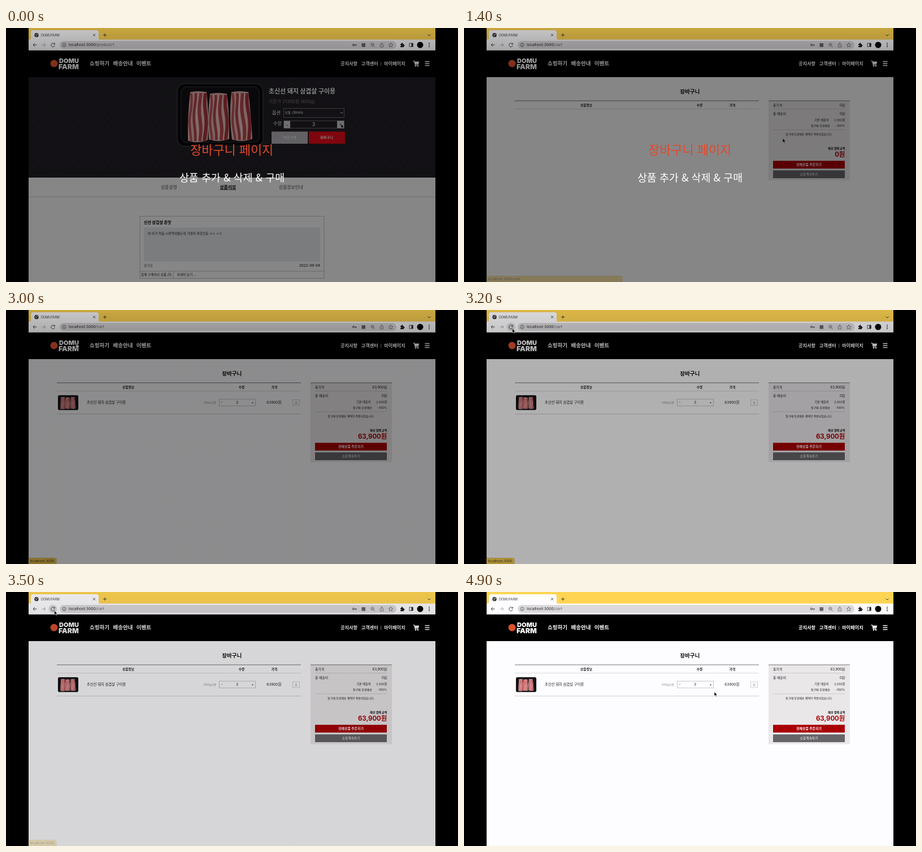
Animation of 800 by 450 pixels, one loop 5 s. Source, as an HTML page:

```html
<!DOCTYPE html>
<html lang="ko">
<head>
<meta charset="utf-8">
<style>
html, body { margin: 0; width: 100%; height: 100%; overflow: hidden; background: #000; }
svg { display: block; width: 800px; height: 450px; }
text { font-family: Inter, "Noto Sans CJK KR", "Noto Sans CJK", sans-serif; white-space: pre; }
.title text { font-family: "Noto Sans CJK KR", "Noto Sans CJK", sans-serif; }
</style>
</head>
<body>
<svg id="stage" viewBox="0 0 800 450"></svg>
<script>
const $ = id => document.getElementById(id);
const WHITE = '#fdfcfe', INK = '#252326';

// Text is placed by the middle of its line.
const text = (x, mid, size, str, fill = INK, anchor = 'start', weight = 400) =>
  `<text x="${x}" y="${(mid + size * .36).toFixed(2)}" font-size="${size}" fill="${fill}" text-anchor="${anchor}" font-weight="${weight}">${str}</text>`;
const rect = (x, y, w, h, fill, more = '') =>
  `<rect x="${x}" y="${y}" width="${w}" height="${h}" fill="${fill}" ${more}/>`;
const frame = (x, y, w, h, color, fill = 'none') =>
  rect(x + .5, y + .5, w - 1, h - 1, fill, `stroke="${color}" stroke-width=".8"`);
const line = (x1, x2, y, color, w = .8) =>
  `<path d="M${x1} ${y}H${x2}" stroke="${color}" stroke-width="${w}"/>`;
const icon = (d, color = '#444246', w = 1) =>
  `<path d="${d}" fill="none" stroke="${color}" stroke-width="${w}" stroke-linejoin="round"/>`;
const shape = (d, fill) => `<path d="${d}" fill="${fill}"/>`;
const disc = (x, y, r, fill) => `<circle cx="${x}" cy="${y}" r="${r}" fill="${fill}"/>`;

// One slice of meat: a pale slab with wavy red bands.
function slab(x, y, w, h, lean) {
  const band = (u, width, color) => {
    let d = '';
    for (let i = 0; i <= 12; i++) {
      const v = i / 12;
      const px = x + w * u + lean * v + Math.sin(v * 7 + u * 4) * 1.6;
      d += (i ? 'L' : 'M') + px.toFixed(1) + ' ' + (y + 2 + (h - 4) * v).toFixed(1);
    }
    return icon(d, color, width);
  };
  return shape(`M${x + 3} ${y}Q${x + w / 2} ${y - 3} ${x + w - 3} ${y}Q${x + w + 2} ${y + h / 2} ${x + w + lean} ${y + h - 4}
    Q${x + w / 2 + lean} ${y + h + 3} ${x + lean} ${y + h - 3}Q${x - 2} ${y + h / 2} ${x + 3} ${y}Z`, '#e9b9b3') +
    band(.12, 4, '#c2545a') + band(.33, 4.5, '#b8434c') + band(.46, 2, '#f3d9d2') +
    band(.6, 6, '#bd4a52') + band(.72, 1.6, '#efcdc6') + band(.87, 6, '#a9353f');
}

const tray = `<symbol id="tray" viewBox="0 0 154 113">
  ${rect(1, 1, 152, 111, '#09090b', 'rx="13" stroke="#3c3a40" stroke-width="1.5"')}
  ${rect(8, 7, 138, 98, '#111114', 'rx="10" stroke="#2b292f" stroke-width="1.5"')}
  ${slab(21, 16, 35, 89, -1)}${slab(56, 19, 36, 84, 1)}${slab(94, 16, 36, 87, 4)}
</symbol>`;

const browser = [
  rect(40, 0, 720, 21, '#ffd452'),
  shape('M41 21Q44 21 44 18V8Q44 4 48 4H160Q164 4 164 8V18Q164 21 167 21Z', WHITE),
  rect(40, 20.5, 720, 19, WHITE),
  disc(54, 12.5, 3.8, '#343236'),
  icon('M51.5 11.5L54 12.5L53 15M54.5 9.5L55.5 11.5L57 12', '#eee', .8),
  text(62, 12.5, 5.6, 'DOMUFARM', '#434145'),
  icon('M154 10.5L158 14.5M158 10.5L154 14.5', '#343236', .9),
  icon('M172 12.5H178M175 9.5V15.5', '#343236', .9),
  icon('M746.5 11.5L749 14L751.5 11.5', '#343236'),
  icon('M54.5 30H48M51 27L48 30L51 33'),
  icon('M63.5 30H70M67 27L70 30L67 33', '#aaa8ac'),
  '<circle id="hover" cx="83" cy="30" r="7.5" fill="#dddbde"/>',
  icon('M85.8 28.2A3.3 3.3 0 1 0 86.3 31M86.3 26.5V28.8H84'),
  rect(95, 23, 596, 14, '#dcd9dc', 'rx="7"'),
  '<circle cx="103" cy="30" r="3.2" fill="none" stroke="#555357" stroke-width=".8"/>',
  icon('M103 29.5V32M103 27.9V28.7', '#555357', .9),
  `<text x="111" y="32.4" font-size="6.75" fill="#252326">localhost:3000<tspan id="path" fill="#626064"></tspan></text>`,
  '<circle cx="615" cy="30" r="1.6" fill="none" stroke="#444246"/>',
  icon('M616.5 30H621M619.5 30V32'),
  rect(629.5, 27, 6.5, 6.5, '#656368'),
  '<circle cx="648.5" cy="29.5" r="2.6" fill="none" stroke="#656368" stroke-width=".9"/>',
  icon('M650.3 31.3L652.7 33.7M647.2 29.5H649.8', '#656368', .9),
  icon('M663.3 29H662.3V33.7H667.7V29H666.7M665 31.5V26.2M663.3 27.8L665 26L666.7 27.8', '#656368', .8),
  icon('M681 26.2L682.1 28.8L685 29L682.8 30.9L683.5 33.7L681 32.2L678.5 33.7L679.2 30.9L677 29L679.9 28.8Z', '#656368', .8),
  shape('M698 28H700Q699.5 26 701 26Q702.5 26 702 28H704V30Q705.7 29.5 705.7 31Q705.7 32.5 704 32V34H698V32Q699.5 32 699.5 31Q699.5 30 698 30Z', INK),
  frame(713.5, 26.5, 7, 7, INK), rect(717.5, 27, 3, 6, INK),
  disc(733, 30, 5.5, '#000'),
  disc(749, 27, .9, INK), disc(749, 30, .9, INK), disc(749, 33, .9, INK)
].join('');

const header = [
  rect(40, 39.5, 720, 47.5, '#000'),
  disc(85, 63, 6.5, '#d8512f'),
  text(94, 57.8, 11, 'DOMU', WHITE, 'start', 900),
  text(93, 68.8, 12.3, 'FARM', WHITE, 'start', 900),
  text(148, 63, 9.5, '쇼핑하기', WHITE, 'start', 700),
  text(189.5, 63, 9.5, '배송안내', WHITE, 'start', 700),
  text(230.7, 63, 9.5, '이벤트', WHITE, 'start', 700),
  text(592, 63, 8.2, '공지사항', WHITE, 'start', 700),
  text(628.7, 63, 8.2, '고객센터', WHITE, 'start', 700),
  rect(663.3, 60, .8, 7, '#aaa'),
  text(669, 63, 8.2, '마이페이지', WHITE, 'start', 700),
  icon('M720.5 58.7H722.7L724.3 65.5H730', WHITE, 1.2),
  shape('M722.8 59.5H731.3L730 64.3H724Z', WHITE), disc(725, 67.2, 1.2, WHITE), disc(729, 67.2, 1.2, WHITE),
  icon('M741.5 59.5H749.5M741.5 63H749.5M741.5 66.5H749.5', WHITE, 1.5)
].join('');

const product = [
  rect(40, 87, 720, 178, '#221f25'),
  '<use href="#tray" x="302" y="97.5" width="154" height="113"/>',
  text(465, 112, 10.9, '초신선 돼지 삼겹살 구이용', WHITE, 'start', 700),
  text(465, 130.5, 7.9, '기준가 21300원 (600g)', '#858187'),
  text(471, 150, 8.2, '옵션', WHITE, 'start', 500),
  frame(491, 142, 108, 17, '#858187'),
  text(493.5, 150.3, 5.8, '보통 (16mm)', WHITE),
  icon('M591.5 149L594 151.5L596.5 149', WHITE, .9),
  text(473, 169.5, 8.2, '수량', WHITE, 'start', 500),
  frame(491, 164, 108, 14, '#858187'),
  rect(492, 164.5, 11, 13, '#d2cfd4'), rect(586, 164.5, 12, 13, '#d2cfd4'),
  text(497.5, 172, 8, '-', '#111', 'middle', 600),
  text(544.5, 170.3, 9, '3', WHITE, 'middle'),
  text(592, 170, 7.5, '+', '#111', 'middle'),
  rect(470, 183.5, 64, 21.5, '#b9b6bc'), rect(536, 183.5, 64, 21.5, '#f00a1a'),
  text(502.3, 194.2, 6.2, '바로구매', WHITE, 'middle', 500),
  text(567.5, 194.2, 6.2, '장바구니', WHITE, 'middle', 700),
  text(288.3, 282, 7.8, '상품설명', '#555357', 'middle'),
  text(392.8, 282, 7.8, '상품리뷰', '#000', 'middle', 700), line(378.5, 407, 286.3, '#000'),
  text(504.5, 282, 7.8, '상품정보안내', '#555357', 'middle'),
  line(40, 760, 299, '#c5c2c6'),
  frame(236.5, 333, 327, 111, '#b9b6ba'),
  text(244, 344.3, 7, '신선 삼겹살 존맛', '#000', 'start', 700),
  rect(244, 353.5, 312, 60, '#e7eaed'),
  text(251, 364, 5.7, '와 이거 처음 시켜먹어봤는데 가성비 최강인듯 ㅇㅇ ㅇㅈ'),
  text(244, 421, 5.8, '문가온', '#555357'),
  text(556, 421, 6.1, '2022-09-04', '#444246', 'end', 600),
  line(237, 563, 431, '#b9b6ba'), rect(295.7, 431, .8, 12.5, '#b9b6ba'),
  text(239, 437.3, 5.7, '함께 구매하신 상품 (5)'),
  text(302.5, 437.3, 5.7, '자세히 보기 ...')
].join('');

const cart = [
  text(399.7, 112.5, 9.5, '장바구니', '#111', 'middle', 700),
  line(90, 522, 129, '#555357'),
  text(216.5, 136.5, 5.7, '상품정보', INK, 'middle', 700),
  text(417, 136.5, 5.7, '수량', INK, 'middle', 700),
  text(475, 136.5, 5.7, '가격', INK, 'middle', 700),
  line(90, 522, 143.7, '#d2cfd3'),
  '<g id="item">',
  '<use href="#tray" x="91.7" y="150.7" width="36.5" height="26.8"/>',
  text(143, 164, 6.3, '초신선 돼지 삼겹살 구이용'),
  text(372, 164.3, 5, '600g기준', '#8b898c', 'end'),
  frame(377, 157.5, 65, 13, '#b9b6ba'),
  text(382, 164, 6.5, '-', INK, 'middle'),
  text(409, 164, 6.5, '3', INK, 'middle'),
  text(436.3, 164, 6.5, '+', INK, 'middle'),
  text(474.3, 164, 6.5, '63900원', INK, 'middle'),
  frame(507, 158.5, 13, 11, '#c5c2c6'),
  text(513.5, 164.3, 6.5, 'X', '#8b898c', 'middle'),
  line(90, 522, 184.3, '#c5c2c6'),
  '</g>',
  rect(539, 129, 144, 140.5, '#eae7e9'), line(539, 683, 129, '#555357'),
  text(547, 136.5, 5.8, '총가격'),
  `<g class="total">${text(674.3, 136.5, 6, '', INK, 'end')}</g>`,
  line(547, 674, 143.7, '#c5c2c6'),
  text(547, 151.5, 5.8, '총 배송비'), text(674.3, 151.5, 6, '0원', INK, 'end'),
  text(645.5, 163.5, 5.2, '기본 배송비', INK, 'end'), text(674.3, 163.5, 5.2, '2,500원', INK, 'end'),
  text(648, 173.5, 5.1, '첫구매 무료배송', INK, 'end'), text(674.3, 173.5, 5.4, '-100%', INK, 'end'),
  line(547, 674, 180.3, '#c5c2c6'),
  text(610.5, 188, 4.95, '첫구매 무료배송 혜택이 적용되었습니다.', INK, 'middle'),
  text(674.3, 213.5, 5, '예상 결제 금액', '#111', 'end', 700),
  `<g class="total">${text(674.3, 224.3, 11.4, '', '#a80005', 'end', 700)}</g>`,
  rect(547, 235.3, 127, 13.7, '#a80005'), rect(547, 252.3, 127, 13.7, '#666468'),
  text(610.5, 242.2, 5.9, '전체상품 주문하기', WHITE, 'middle', 700),
  text(610.5, 259.2, 5.8, '쇼핑계속하기', WHITE, 'middle', 500)
].join('');

$('stage').innerHTML = `
<defs>${tray}
  <linearGradient id="shade" x1="0" y1="0" x2="0" y2="1">
    <stop offset="0" stop-opacity=".22"/><stop offset=".19" stop-opacity=".47"/>
  </linearGradient>
</defs>
${rect(0, 0, 800, 450, '#000')}
${rect(40, 39, 720, 411, WHITE)}
<g id="product">${product}</g><g id="cart">${cart}</g>${header}${browser}
<g id="status">
  <path id="bubble" fill="#ffd452" stroke="#c9a83f" stroke-width=".6"/>
  <text id="link" x="42.5" y="447.2" font-size="6.1" fill="#3c361f"></text>
</g>
<g id="arrow"><path d="M0 0V7.3L1.8 5.7L3 8.4L4.3 7.8L3.1 5.2H5.3Z" fill="#000" stroke="#fff" stroke-width=".6"/></g>
<g id="hand"><path d="M-.8 0Q0 -.9 .8 0V3L3.6 3.6Q4.4 4 4.1 5.2L3.4 8H-.6L-2.8 5Q-2.6 3.9 -.8 5Z" fill="#fff" stroke="#000" stroke-width=".6"/></g>
<rect id="dim" width="800" height="450" fill="url(#shade)"/>
<g id="title" class="title">
  ${text(399.7, 216, 21.9, '장바구니 페이지', '#e4482a', 'middle')}
  ${text(400, 265, 18.4, '상품 추가 &amp; 삭제 &amp; 구매', '#fff', 'middle')}
</g>`;

// Value at t along [time, ...values] keys; smooth eases between them.
function at(keys, t, smooth) {
  const i = keys.findIndex(k => k[0] > t);
  if (i < 0) return keys[keys.length - 1].slice(1);
  if (!i) return keys[0].slice(1);
  const a = keys[i - 1], b = keys[i];
  let u = (t - a[0]) / (b[0] - a[0]);
  if (smooth) u = u * u * (3 - 2 * u);
  return a.slice(1).map((v, j) => v + (b[j + 1] - v) * u);
}

const pointer = [[0, 593, 170], [200, 593, 170], [700, 564, 195.5], [1900, 564, 195.5], [2600, 125, 59],
  [3000, 125, 59], [3200, 85.5, 33], [4300, 85.5, 33], [4900, 443, 177]];
const shade = [[2900, 1], [3000, .95], [3300, .49], [3800, .08], [4200, 0]];
const titleFade = [[2500, 1], [2900, 0]];
const linkFade = [[700, 0], [800, 1], [1200, 1], [1600, 0], [2600, 0], [2700, 1], [3300, 1], [3600, 0]];

const show = (id, on) => $(id).style.display = on ? '' : 'none';
const fade = (id, keys, t) => $(id).setAttribute('opacity', at(keys, t)[0]);

function draw(t) {
  const inCart = t >= 1200, loaded = t >= 1500;
  show('product', !inCart);
  show('cart', inCart);
  show('item', loaded);
  $('path').textContent = inCart ? '/cart' : '/product/1';
  document.querySelectorAll('.total text').forEach(e => e.textContent = loaded ? '63,900원' : '0원');

  const home = t >= 2000, right = home ? 89 : inCart ? 280 : 102;
  $('bubble').setAttribute('d', `M40 439.5H${right - 2}Q${right} 439.5 ${right} 442V450H40Z`);
  $('link').textContent = home ? 'localhost:3000' : 'localhost:3000/cart';
  fade('status', linkFade, t);

  const [x, y] = at(pointer, t, true);
  const onLink = (t >= 600 && t < 1300) || (t >= 2600 && t < 3100);
  show('hand', onLink);
  show('arrow', !onLink);
  $(onLink ? 'hand' : 'arrow').setAttribute('transform', `translate(${x} ${y})`);
  show('hover', t >= 3200 && t < 4400);

  fade('dim', shade, t);
  fade('title', titleFade, t);
}

const start = performance.now();
function tick(now) {
  draw(Math.floor(Math.max(0, now - start) % 5000 / 100) * 100);
  requestAnimationFrame(tick);
}
draw(0);
requestAnimationFrame(tick);
</script>
</body>
</html>
```
